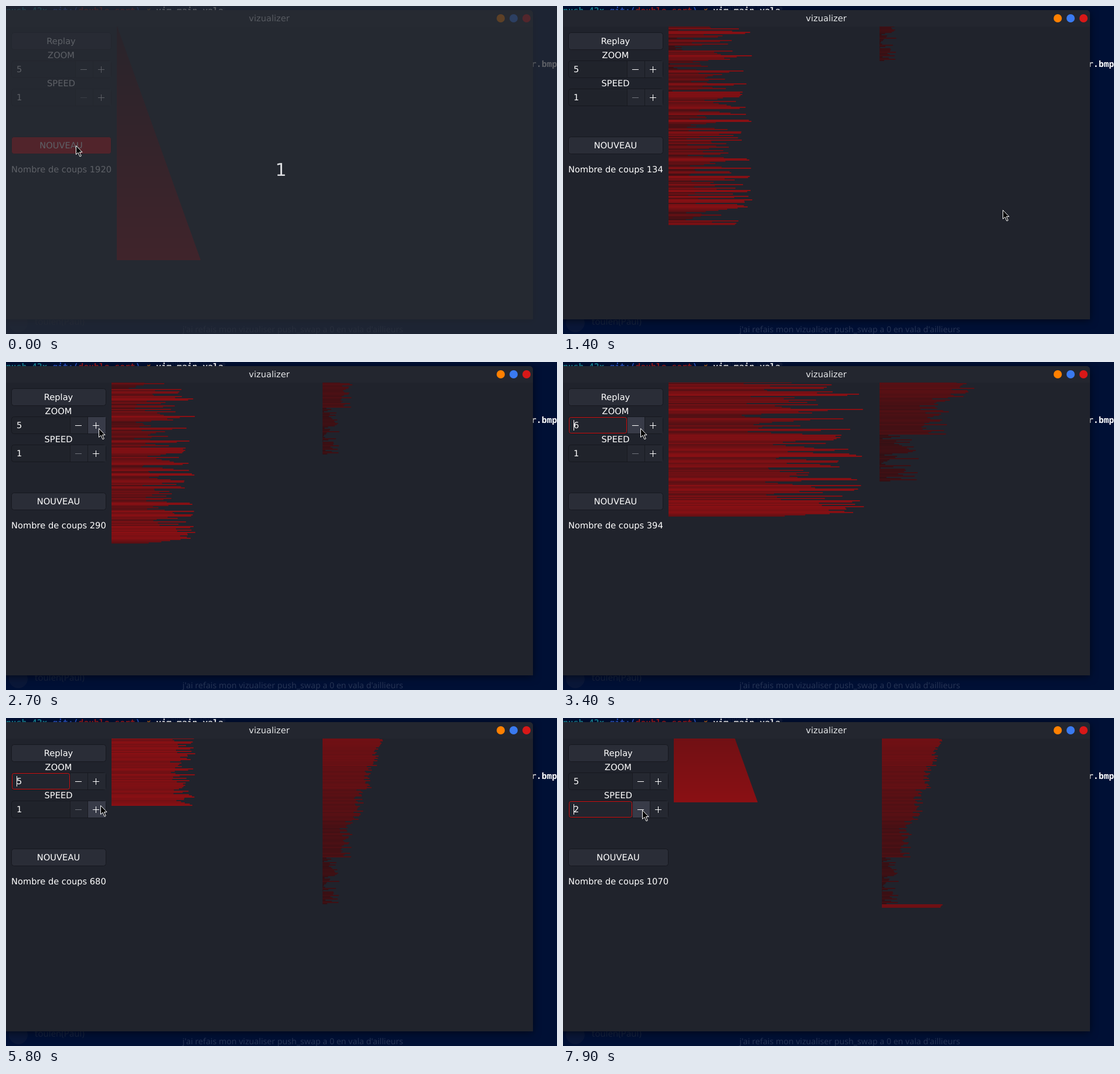
Recreate the animation shown at these times as an HTML page with a canvas. Size 940 by 560 pixels, loop 8000 ms.

```html
<!DOCTYPE html>
<html lang="fr">
<head>
<meta charset="utf-8">
<title>vizualizer</title>
<style>
html, body { margin: 0; width: 940px; height: 560px; overflow: hidden; background: #001035; }
canvas { display: block; }
</style>
</head>
<body>
<canvas id="stage" width="940" height="560"></canvas>
<script>
const ctx = document.getElementById('stage').getContext('2d');
ctx.textRendering = 'geometricPrecision';
const SANS = '14.667px "DejaVu Sans", sans-serif';
const MONO = 'bold 14.667px "DejaVu Sans Mono", monospace';
const NOTO = '14.15px "Noto Sans", sans-serif';
const LOOP = 8000, TOTAL = 200, RIGHT = 899, TOP = 34;
const DIVISOR = { 4: 12, 5: 7, 6: 3 };

// Sorting with two stacks: push the smallest fifth again and again, then take back the maxima
let seed = 4242;
function random() {
  seed = (seed * 1664525 + 1013904223) % 4294967296;
  return seed / 4294967296;
}
const sorted = Array.from({ length: TOTAL }, (_, i) => i + 1);

function simulate() {
  let a = sorted.slice(), b = [];
  for (let i = TOTAL - 1; i > 0; i--) {
    const j = Math.floor(random() * (i + 1));
    [a[i], a[j]] = [a[j], a[i]];
  }
  const states = [];
  const save = () => states.push({ a: a.slice(), b: b.slice() });
  save();
  let limit = 0;
  while (a.length > 6) {
    limit += Math.round(a.length / 5);
    while (b.length < limit) {
      const v = a.shift();
      if (v <= limit) b.unshift(v); else a.push(v);
      save();
    }
  }
  a.sort((x, y) => x - y);
  save();
  while (b.length) {
    const i = b.indexOf(Math.max(...b));
    if (i === 0) a.unshift(b.shift());
    else if (i <= b.length / 2) b.push(b.shift());
    else b.unshift(b.pop());
    save();
  }
  return states;
}
const states = simulate();
const peak = states.findIndex(s => s.b.length === TOTAL - 6);
const rising = n => states.findIndex(s => s.b.length === n);
const falling = n => states.findIndex((s, i) => i > peak && s.b.length === n);

// Keys are [time, values...]
const stepKeys = [
  [350, 0], [1000, rising(15)], [1400, rising(30)], [2700, rising(62)], [3400, rising(85)],
  [4700, rising(114)], [5400, rising(134)], [5800, rising(142)], [6300, rising(158)],
  [7000, peak], [7200, falling(184)], [7900, falling(145)]
];
const countKeys = [
  [350, 0], [1400, 134], [2700, 290], [3400, 394], [4700, 550], [5800, 680],
  [5900, 693], [6300, 793], [7000, 960], [7900, 1070]
];
const pointerKeys = [
  [200, 119, 238], [1200, 750, 348], [1500, 750, 348], [1800, 575, 350], [2400, 60, 190],
  [2700, 158, 113], [3000, 158, 113], [3300, 132, 113], [4000, 132, 113], [4300, 157, 113],
  [4700, 158, 132], [4900, 157, 113], [5100, 157, 113], [5700, 161, 149], [6400, 161, 149],
  [7500, 163, 156], [7800, 135, 157]
];

function at(keys, t) {
  const i = keys.findIndex(k => k[0] > t);
  if (i === 0) return keys[0].slice(1);
  if (i < 0) return keys[keys.length - 1].slice(1);
  const p = keys[i - 1], q = keys[i], f = (t - p[0]) / (q[0] - p[0]);
  return p.slice(1).map((v, n) => v + (q[n + 1] - v) * f);
}

function text(str, x, y, color = '#fff', font = SANS, align = 'left') {
  ctx.font = font;
  ctx.fillStyle = color;
  ctx.textAlign = align;
  ctx.fillText(str, x, y);
}

function disc(x, y, r, color) {
  ctx.fillStyle = color;
  ctx.beginPath();
  ctx.arc(x, y, r, 0, 7);
  ctx.fill();
}

function box(x, y, w, h, fill, stroke = '#16181f', radius = 4) {
  ctx.beginPath();
  ctx.roundRect(x + .5, y + .5, w - 1, h - 1, radius);
  ctx.fillStyle = fill;
  ctx.fill();
  ctx.strokeStyle = stroke;
  ctx.lineWidth = 1;
  ctx.stroke();
}

function backdrop() {
  ctx.fillStyle = '#001035';
  ctx.fillRect(0, 0, 940, 560);
  text('(ailleurs loin)  ●', 275, 8, '#0f1c3e', NOTO);
  let x = 0;
  const prompt = [['push_42x ', '#19899a'], ['git:(', '#2a55c8'], ['double_sort', '#a01a1c'],
    [') ', '#2a55c8'], ['✗ ', '#e07818'], ['vim main.vala', '#fff']];
  for (const [str, color] of prompt) {
    text(str, x, 13, color, MONO);
    x += str.length * 8.83;
  }
  text('r.bmp', 896, 104, '#fff', MONO);
  disc(21, 541, 16, '#0a1738');
  text('toulen(Paul)', 49, 544, '#17233f', '15px "Noto Sans", sans-serif');
  text("j'ai refais mon vizualiser push_swap a 0 en vala d'aillieurs", 301, 557, '#263454', NOTO);
}

function frame() {
  ctx.save();
  ctx.shadowColor = 'rgba(0,0,0,.55)';
  ctx.shadowBlur = 14;
  ctx.shadowOffsetY = 2;
  ctx.fillStyle = '#20232c';
  ctx.beginPath();
  ctx.roundRect(-10, 7, RIGHT + 10, 528, [0, 6, 0, 0]);
  ctx.fill();
  ctx.restore();
  ctx.fillStyle = '#23262f';
  ctx.beginPath();
  ctx.roundRect(-10, 7, RIGHT + 10, 28, [0, 6, 0, 0]);
  ctx.fill();
  text('vizualizer', 449, 26, '#e4e6e8', SANS, 'center');
  disc(844, 21, 7, '#ff8000');
  disc(866, 21, 7, '#3a7af0');
  disc(888, 21, 7, '#d81818');
}

function bars(values, x, zoom) {
  values.forEach((v, i) => {
    ctx.fillStyle = `rgb(${Math.round(46 + v * .46)},16,20)`;
    ctx.fillRect(x, TOP + 2 * i, v * 5 / DIVISOR[zoom], 2);
  });
}

function spinner(y, value, right, focused, canLower, px, py) {
  const split = right - 61, half = right - 31;
  box(9, y, right - 8, 30, '#20232b');
  const over = (l, r) => px >= l && px < r && py >= y && py < y + 30;
  const button = (l, r) => {
    ctx.fillStyle = over(l, r) ? '#383b48' : '#252831';
    ctx.fillRect(l + 1, y + 1, r - l - 1, 28);
    ctx.fillStyle = '#181a21';
    ctx.fillRect(l, y + 1, 1, 28);
  };
  button(split, half);
  button(half, right);
  ctx.fillStyle = canLower ? '#fff' : '#70737b';
  ctx.fillRect(right - 52, y + 15, 11, 1);
  ctx.fillStyle = '#fff';
  ctx.fillRect(right - 22, y + 15, 11, 1);
  ctx.fillRect(right - 17, y + 10, 1, 11);
  if (focused) {
    box(10, y + 1, split - 10, 28, '#22252e', '#d01010', 3);
    ctx.fillStyle = '#fff';
    ctx.fillRect(18, y + 6, 1, 18);
  }
  text(value, 18, y + 20);
}

function pointer(x, y) {
  ctx.save();
  ctx.translate(x + .5, y + .5);
  const arrow = new Path2D('M0 0V15L3.5 11.8L6.5 18.5L8.8 17.5L6 11H10.5Z');
  ctx.fillStyle = '#000';
  ctx.fill(arrow);
  ctx.strokeStyle = '#fff';
  ctx.lineWidth = 1;
  ctx.stroke(arrow);
  ctx.restore();
}

function draw(t) {
  const fresh = t >= 300;
  const count = fresh ? Math.round(at(countKeys, t)[0]) : 1920;
  const state = fresh ? states[Math.round(at(stepKeys, t)[0])] : { a: sorted, b: [] };
  const zoom = t < 2800 ? 5 : t < 3500 ? 6 : t < 3800 ? 5 : t < 5000 ? 4 : 5;
  const speed = t < 6000 ? 1 : 2;
  const [px, py] = at(pointerKeys, t);

  backdrop();
  frame();

  // The counter's width sets the width of the side panel
  const right = Math.round(170 + 9.33 * (String(count).length - 3));
  const left = right + 10, mid = (9 + right) / 2;
  ctx.save();
  ctx.beginPath();
  ctx.rect(0, 35, RIGHT, 500);
  ctx.clip();
  bars(state.a, left, zoom);
  bars(state.b, Math.round((left + RIGHT) / 2), zoom);
  ctx.restore();

  const wide = (label, y, pressed) => {
    const over = px >= 9 && px < right && py >= y && py < y + 30;
    box(9, y, right - 8, 30, pressed ? '#d01014' : over ? '#383b48' : '#2a2d37');
    text(label, mid, y + 20, '#fff', SANS, 'center');
  };
  wide('Replay', 45, false);
  text('ZOOM', mid, 89, '#fff', SANS, 'center');
  spinner(93, zoom, right, t >= 2800 && t < 6000, true, px, py);
  text('SPEED', mid, 137, '#fff', SANS, 'center');
  spinner(141, speed, right, t >= 6000, speed > 1, px, py);
  wide('NOUVEAU', 223, !fresh);
  text('Nombre de coups ' + count, 9, 284);

  if (t < 100) {
    ctx.fillStyle = 'rgba(39,43,51,.75)';
    ctx.fillRect(0, 0, 940, 560);
    text('1', 469, 290, '#dcdde0', '30px "DejaVu Sans", sans-serif', 'center');
  }
  pointer(px, py);
}

function tick() {
  draw(Math.floor(performance.now() % LOOP / 100) * 100);
  requestAnimationFrame(tick);
}
tick();
</script>
</body>
</html>
```
